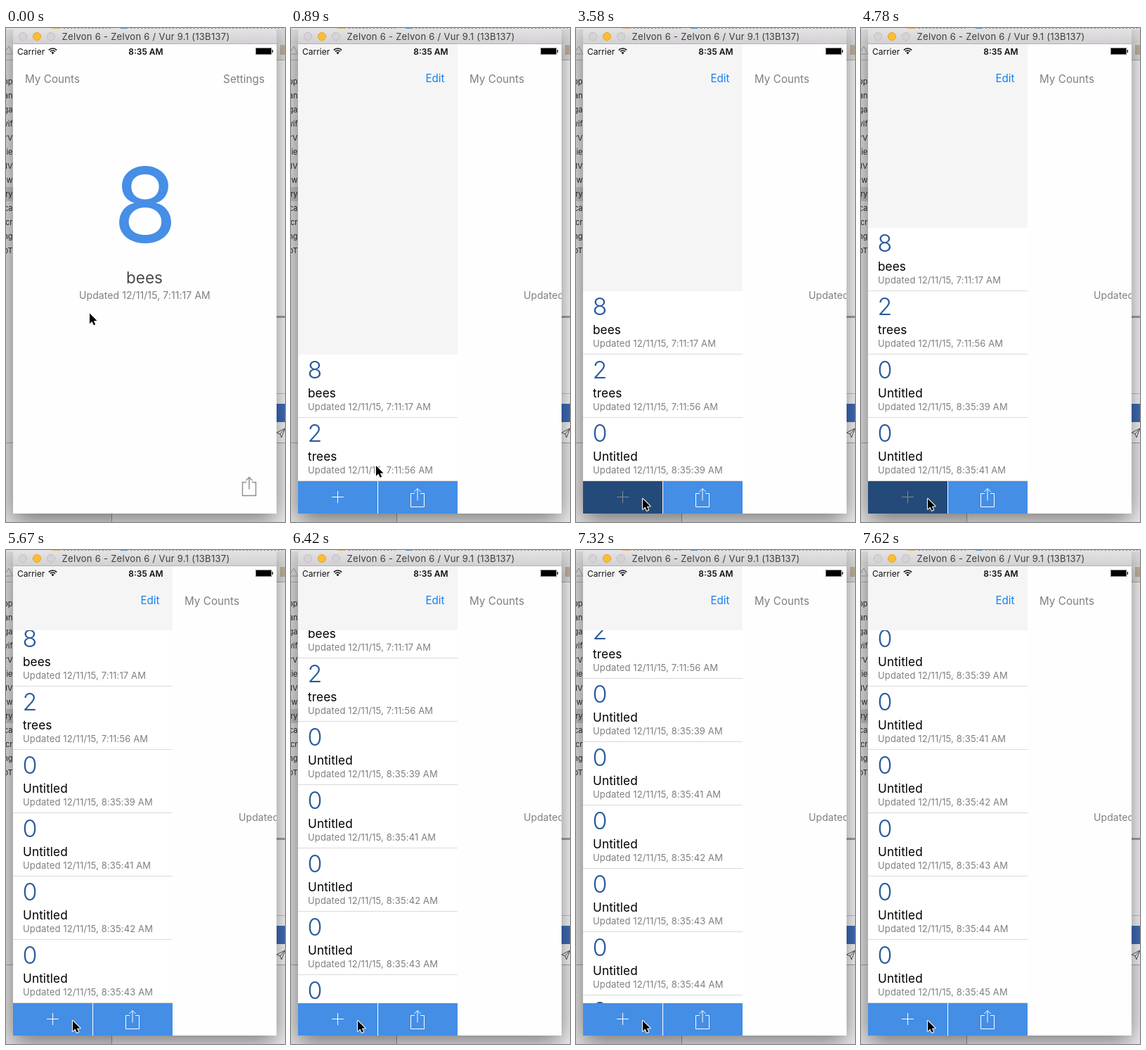
These frames come from a looping animation (397 by 702 pixels, 8000 ms). An HTML page with a canvas:

```html
<!DOCTYPE html>
<html lang="en">
<head>
<meta charset="utf-8">
<title>Counter list</title>
<style>
html, body { margin: 0; width: 100%; height: 100%; overflow: hidden; background: #ddd; }
canvas { display: block; width: 397px; height: 702px; }
</style>
</head>
<body>
<canvas id="stage"></canvas>
<script>
const W = 397, H = 702, LOOP = 8000;
const LEFT = 10, RIGHT = 385, BOTTOM = 690;
const MENU_W = 227, LIST_TOP = 114, LIST_END = 644, ROW = 90;
const GREY = '#7f7f7f', BLUE = '#448ee6', NAVY = '#2a5b9c', PAPER = '#fefefe';

const canvas = document.getElementById('stage');
const ctx = canvas.getContext('2d');
const dpr = window.devicePixelRatio || 1;
canvas.width = W * dpr;
canvas.height = H * dpr;

const ticks = [0, 150, 290, 440, 590, 740, 890, 1040, 1190, 1640, 1790, 2230, 3580, 3730,
  4780, 4930, 5670, 6270, 6420, 6570, 6720, 7170, 7320, 7470, 7620];
const pointer = [[0, 119, 405.5], [150, 242, 409], [290, 275, 424], [440, 248, 462], [590, 212, 509],
  [740, 180, 565], [890, 121, 622], [1040, 98, 665], [1190, 96, 670], [2230, 95, 669]];
const panelStops = [[0, 0], [290, 156], [440, 232], [590, 229], [740, MENU_W]];
const presses = [[1640, 1790], [3580, 3730], [4780, 4930], [7170, 7320]];
const inserts = [1790, 3730, 4930, 5670, 6270, 7320];
const scrolls = [6246, 7231];
const SCROLL_MS = 372;

const day = 'Updated 12/11/15, ';
const rows = [['8', 'bees', '7:11:17'], ['2', 'trees', '7:11:56'],
  ...[39, 41, 42, 43, 44, 45].map(s => ['0', 'Untitled', '8:35:' + s])];

const latest = (list, t) => list.filter(k => k[0] <= t).pop();

function easeInOut(x) {
  if (x <= 0) return 0;
  if (x >= 1) return 1;
  let lo = 0, hi = 1, u = 0.5;
  for (let i = 0; i < 20; i++) {
    u = (lo + hi) / 2;
    const bx = 1.26 * u * (1 - u) ** 2 + 1.74 * u * u * (1 - u) + u ** 3;
    if (bx < x) lo = u; else hi = u;
  }
  return u * u * (3 - 2 * u);
}

function box(x, y, w, h, color) {
  ctx.fillStyle = color;
  ctx.fillRect(x, y, w, h);
}

function text(str, x, y, size, color, { weight = 400, align = 'left', gap = 0 } = {}) {
  ctx.font = `${weight} ${size}px Inter, Roboto, sans-serif`;
  ctx.letterSpacing = gap + 'px';
  ctx.textAlign = align;
  ctx.fillStyle = color;
  ctx.fillText(str, x, y);
}

function line(points, color, width = 1, close = false) {
  ctx.beginPath();
  points.forEach(([x, y]) => ctx.lineTo(x, y));
  if (close) ctx.closePath();
  ctx.strokeStyle = color;
  ctx.lineWidth = width;
  ctx.stroke();
}

function disc(x, y, r, fill, stroke) {
  ctx.beginPath();
  ctx.arc(x, y, r, 0, 7);
  ctx.fillStyle = fill;
  ctx.fill();
  ctx.strokeStyle = stroke;
  ctx.lineWidth = 1;
  ctx.stroke();
}

function clipped(x, y, w, h, draw) {
  ctx.save();
  ctx.beginPath();
  ctx.rect(x, y, w, h);
  ctx.clip();
  draw();
  ctx.restore();
}

function shareIcon(x, y, color, width) {
  line([[x - 4, y + 8], [x - 9.5, y + 8], [x - 9.5, y + 27], [x + 9.5, y + 27],
    [x + 9.5, y + 8], [x + 4, y + 8]], color, width);
  line([[x, y + 1], [x, y + 18]], color, width);
  line([[x - 4.5, y + 5.5], [x, y + 1], [x + 4.5, y + 5.5]], color, width);
}

function desktop() {
  box(0, 0, W, H, '#e3e3e3');
  box(0, 0, W, 22, '#dedede');
  box(0, 45, W, 1, '#b4b4b4');
  box(0, 226, 10, 20, '#c4c4c4');
  const words = ['pp', 'pan', 'ga', 'wif', 'erV', 'Vie', 'elV', 'iew', 'ry', 'xca', 'Scr', 'ing', 'ppT'];
  box(RIGHT, 46, 12, 543, '#fbfbfb');
  box(RIGHT, 409, 12, 3, '#a5a5a5');
  box(RIGHT, 519, 12, 1, '#c8c8c8');
  box(RIGHT, 534, 12, 26, '#426fbd');
  box(0, 589, W, 1, '#a8a8a8');
  box(0, 590, W, 112, '#e4e4e4');
  box(151, 590, 246, 112, '#f0f0f0');
  box(150, 590, 1, 112, '#a0a0a0');
  box(390, 24, 7, 14, '#c6b79f');

  ctx.save();
  ctx.shadowColor = 'rgba(0,0,0,.5)';
  ctx.shadowBlur = 32 * dpr;
  ctx.shadowOffsetY = 10 * dpr;
  box(LEFT, 3, RIGHT - LEFT, BOTTOM - 3, PAPER);
  ctx.restore();

  clipped(0, 23, LEFT, 330, () => {
    line([[-3, 37], [4, 26], [10, 37]], '#8a8a8a', 1, true);
    words.forEach((w, i) => text(w, 9.5, 80 + 20 * i, 11, '#222', { align: 'right' }));
  });
  line([[385, 575], [397, 569], [392, 582], [390, 577], [385, 575]], '#4a4a4a');
  line([[390, 577], [397, 569]], '#4a4a4a');
}

function titleBar() {
  box(0, 0, W, 2, '#e2e2e2');
  box(66, 0, 12, 1, '#d9b36a');
  box(163, 0, 10, 1, '#5a93c4');
  for (let x = 82; x < 395; x += 5) if (x < 150 || x > 175) box(x, 0, 2, 1, '#8f8f8f');
  const g = ctx.createLinearGradient(0, 2, 0, 23);
  g.addColorStop(0, '#e4e2e4');
  g.addColorStop(1, '#d1cfd1');
  box(LEFT, 2, RIGHT - LEFT, 21, g);
  box(LEFT, 22, RIGHT - LEFT, 1, '#b5b3b5');
  disc(24, 12, 5.5, '#d5d3d5', '#c0bec0');
  disc(44, 12, 5.5, '#fdbd2f', '#e2a52b');
  disc(64, 12, 5.5, '#d5d3d5', '#c0bec0');
  text('Zelvon 6 - Zelvon 6 / Vur 9.1 (13B137)', 199, 17, 13, '#3e3e3e', { align: 'center', gap: 0.28 });
}

function statusBar() {
  text('Carrier', 16, 38, 12, '#111');
  text('8:35 AM', 199, 38, 12, '#111', { weight: 600, align: 'center' });
  ctx.strokeStyle = '#111';
  ctx.lineWidth = 1.7;
  for (const r of [8, 5]) {
    ctx.beginPath();
    ctx.arc(66.5, 37, r, -Math.PI * 0.75, -Math.PI * 0.25);
    ctx.stroke();
  }
  ctx.beginPath();
  ctx.moveTo(66.5, 37.5);
  ctx.arc(66.5, 37, 2.8, -Math.PI * 0.75, -Math.PI * 0.25);
  ctx.fillStyle = '#111';
  ctx.fill();
  ctx.strokeStyle = '#808080';
  ctx.lineWidth = 1;
  ctx.strokeRect(355.5, 28.5, 22, 9);
  box(356, 29, 21, 8, '#000');
  box(378.5, 31, 1.5, 4, '#222');
}

function list(t) {
  const moving = scrolls.reduce((sum, s) => sum + easeInOut((t - s) / SCROLL_MS) * ROW, 0);
  const count = 2 + inserts.filter(k => k <= t).length;
  const top = LIST_END - Math.min(count, 6) * ROW - moving;
  clipped(LEFT, LIST_TOP, MENU_W, LIST_END - LIST_TOP, () => {
    for (let i = 0; i < count; i++) {
      const y = Math.round(top + i * ROW);
      const [num, name, time] = rows[i];
      box(LEFT, y, MENU_W, ROW, '#fff');
      box(LEFT, y + 89, MENU_W, 1, '#dadada');
      text(num, 23.5, y + 34, 34, NAVY, { weight: 300 });
      text(name, 24, y + 61, 17.2, '#000', { gap: 0.1 });
      text(day + time + ' AM', 24, y + 78.5, 13, GREY, { gap: 0.13 });
    }
  });
}

function menu(t) {
  const pressed = presses.some(([a, b]) => t >= a && t < b);
  box(LEFT, 23, MENU_W, BOTTOM - 23, '#f5f5f5');
  text('Edit', 218.5, 76.5, 15.2, '#1180f5', { align: 'right' });
  list(t);
  box(LEFT, LIST_END, MENU_W, BOTTOM - LIST_END, BLUE);
  if (pressed) box(LEFT, LIST_END, 113, BOTTOM - LIST_END, '#244a79');
  box(123, LIST_END, 1, BOTTOM - LIST_END, '#fff');
  const ink = pressed ? '#858a90' : '#fff';
  line([[58, 666.5], [75, 666.5]], ink);
  line([[66.5, 658], [66.5, 675]], ink);
  shareIcon(180, 653.5, '#fff', 1);
}

function panel(dx) {
  const x = LEFT + dx;
  box(x, 23, RIGHT - x, BOTTOM - 23, PAPER);
  text('My Counts', x + 17, 77.5, 15.2, GREY, { gap: 0.05 });
  text('Settings', x + 358, 77.5, 15.2, GREY, { align: 'right', gap: 0.05 });
  text('8', x + 188, 304.5, 148, '#468ee6', { align: 'center' });
  text('bees', x + 187, 363, 22.5, '#4a4a4a', { align: 'center' });
  text(day + '7:11:17 AM', x + 94, 384.5, 14, GREY, { gap: 0.08 });
  shareIcon(x + 336, 637.5, '#8c8c8c', 1.4);
}

function cursor(x, y) {
  ctx.save();
  ctx.translate(x, y);
  ctx.scale(1.05, 1.05);
  ctx.beginPath();
  [[0, 0], [0, 14], [3.2, 11], [5.5, 16], [7.8, 15], [5.6, 10.2], [10, 10]].forEach(p => ctx.lineTo(...p));
  ctx.closePath();
  ctx.lineJoin = 'round';
  ctx.lineWidth = 2;
  ctx.strokeStyle = '#fff';
  ctx.stroke();
  ctx.fillStyle = '#000';
  ctx.fill();
  ctx.restore();
}

function draw(now) {
  const time = now % LOOP;
  const t = ticks.filter(k => k <= time).pop();
  const [, px, py] = latest(pointer, t);
  const [, dx] = latest(panelStops, t);
  ctx.setTransform(dpr, 0, 0, dpr, 0, 0);
  desktop();
  titleBar();
  clipped(LEFT, 23, RIGHT - LEFT, BOTTOM - 23, () => {
    if (dx) menu(t);
    panel(dx);
    // Past its resting place the panel uncovers only blank space.
    if (dx > MENU_W) box(LEFT + MENU_W, 23, dx - MENU_W, BOTTOM - 23, PAPER);
    statusBar();
  });
  cursor(px, py);
}

const start = performance.now();
function loop() {
  draw(performance.now() - start);
  requestAnimationFrame(loop);
}
loop();
</script>
</body>
</html>
```
